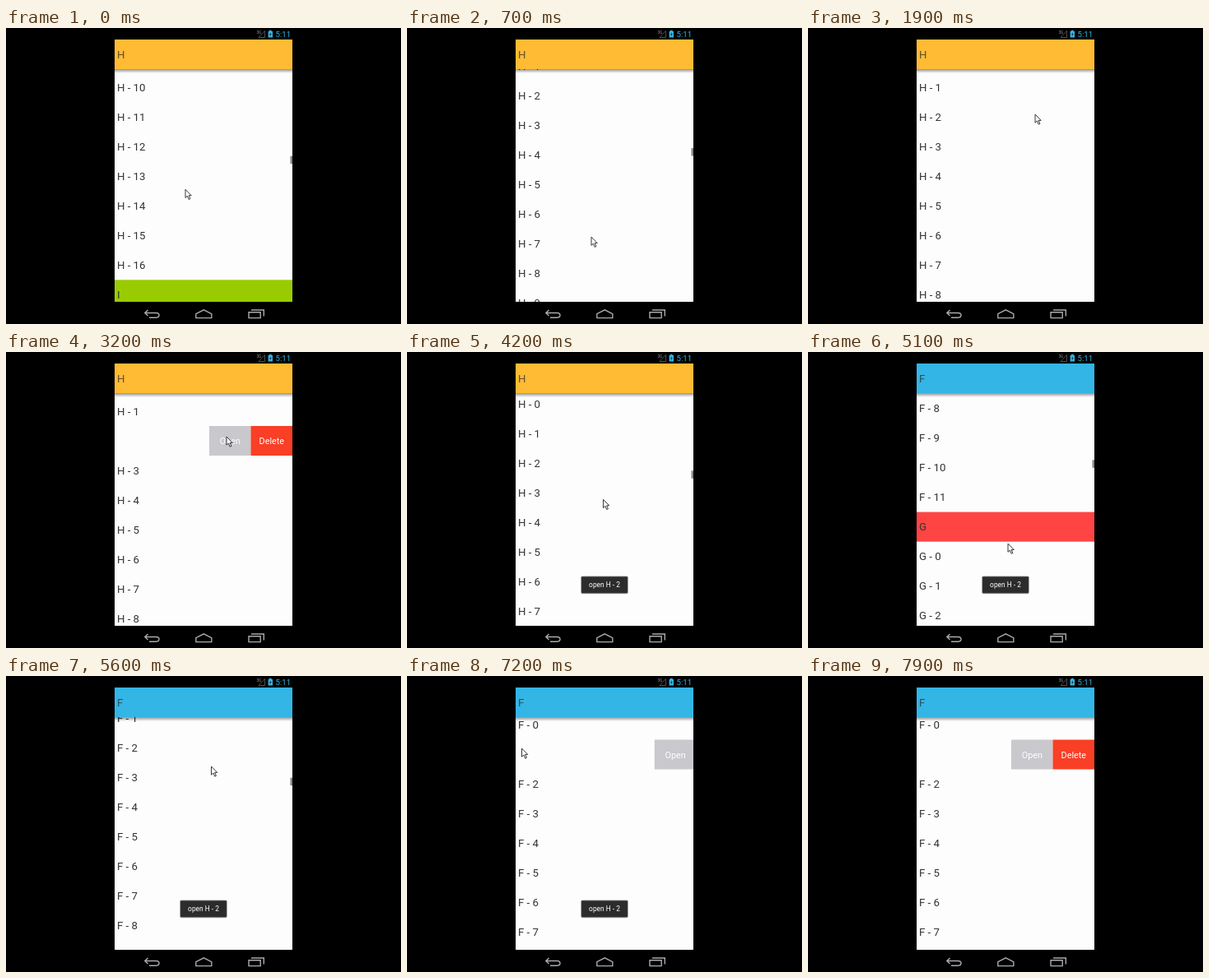
Write an HTML page that moves like this. It is 480 by 360 pixels and loops after 8000 ms.

```html
<!DOCTYPE html>
<html lang="en">
<head>
<meta charset="utf-8">
<title>Pinned section list</title>
<style>
  html, body { margin: 0; width: 100%; height: 100%; overflow: hidden; background: #000; }
  svg { display: block; width: 480px; height: 360px; }
  text { font-family: Roboto, "Noto Sans", sans-serif; white-space: pre; }
  .row { font-size: 13.2px; fill: #333; }
  .btn { font-size: 10.8px; fill: #fff; text-anchor: middle; }
</style>
</head>
<body>
<svg viewBox="0 0 480 360">
  <defs>
    <clipPath id="screen"><rect x="132" y="14" width="216" height="319"/></clipPath>
    <linearGradient id="shade" x1="0" y1="0" x2="0" y2="1">
      <stop offset="0" stop-color="#000" stop-opacity=".42"/>
      <stop offset="1" stop-color="#000" stop-opacity="0"/>
    </linearGradient>
  </defs>
  <rect width="480" height="360" fill="#000"/>

  <g id="status">
    <path d="M307 11.5H314.5V3.5Z" fill="none" stroke="#555" stroke-width=".9"/>
    <text x="304.5" y="6.8" font-size="4.6" fill="#999">3G</text>
    <path d="M320 2.8H322.6V4H324V11.4H318.6V4H320Z" fill="#33b5e5"/>
    <path d="M322 5.2L320 8.2H321.3L320.7 10.3L322.8 7.2H321.4Z" fill="#123"/>
    <text x="327.6" y="10.6" font-size="9.6" fill="#33b5e5">5:11</text>
  </g>

  <g clip-path="url(#screen)">
    <rect x="132" y="14" width="216" height="319" fill="#fdfdfd"/>
    <g id="rows"></g>
    <g id="menu">
      <rect width="50.5" height="36" fill="#c8c8cd"/>
      <rect x="50.5" width="50.5" height="36" fill="#f93f25"/>
      <text class="btn" x="25.3" y="22">Open</text>
      <text class="btn" x="75.8" y="22">Delete</text>
    </g>
    <rect id="shadow" x="132" width="216" fill="url(#shade)"/>
    <g id="pin">
      <rect x="132" width="216" height="36"/>
      <text class="row" x="135" y="22.8" opacity=".8"></text>
    </g>
    <rect id="thumb" x="345.5" width="2.5" height="9.5" fill="#888"/>
    <g id="toast">
      <rect x="211" y="272.5" width="58" height="22" rx="2" fill="#000" opacity=".16"/>
      <rect x="212" y="273.2" width="56" height="20" rx="1" fill="#2c2c2c" stroke="#444" stroke-width=".6"/>
      <text x="240" y="286.3" font-size="8.4" fill="#fff" text-anchor="middle">open H - 2</text>
    </g>
  </g>

  <g fill="none" stroke="#aaa" stroke-width="1.4">
    <path d="M172.5 343L168.8 346.5L172.5 350M169 346.5H182.5Q186 346.5 186 349.3T182.5 352.2H174"/>
    <path d="M230.8 352.6V347.6L240.3 342.8L249.8 347.6V352.6Z"/>
    <path d="M295 345.8H309.2V352.6H295ZM298 343H313.3V350.6"/>
  </g>
  <path id="cursor" d="M0 0V10.2L2.4 8L4.2 12.2L5.9 11.4L4.1 7.4H7.2Z" fill="#fff" stroke="#222" stroke-width=".9"/>
</svg>
<script>
const LOOP = 8000, ROW = 36, TOP = 14, VIEW = 319, MENU_RIGHT = 348;
const COLORS = ['#99cc00', '#33b5e5', '#ff4444', '#ffbb33'];
const SECTIONS = 15;
const $ = id => document.getElementById(id);

// Build the sectioned list
const items = [], heads = [];
for (let s = 0; s < SECTIONS; s++) {
  const letter = String.fromCharCode(65 + s);
  const count = Math.floor(Math.abs(Math.cos(2 * Math.PI / 3 * SECTIONS / (s + 1))) * 25 + 1e-6);
  const head = { label: letter, color: COLORS[s % 4], pos: items.length * ROW };
  heads.push(head);
  items.push(head);
  for (let n = 0; n < count; n++) items.push({ label: letter + ' - ' + n });
}

// Smooth, non-overshooting curve through [time, value] points
function track(pts) {
  const slope = i => (pts[i + 1][1] - pts[i][1]) / (pts[i + 1][0] - pts[i][0]);
  const tan = pts.map((p, i) => {
    if (!i || i === pts.length - 1) return 0;
    const a = slope(i - 1), b = slope(i);
    return a * b > 0 ? 2 * a * b / (a + b) : 0;
  });
  return t => {
    if (t <= pts[0][0]) return pts[0][1];
    for (let i = 0; i < pts.length - 1; i++) {
      const [t0, v0] = pts[i], [t1, v1] = pts[i + 1];
      if (t > t1) continue;
      const h = t1 - t0, u = (t - t0) / h, w = 1 - u;
      return v0 * (1 + 2 * u) * w * w + tan[i] * h * u * w * w
        + v1 * u * u * (3 - 2 * u) - tan[i + 1] * h * u * u * w;
    }
    return pts[pts.length - 1][1];
  };
}

const scroll = track([[-100, 4382], [0, 4352], [250, 4252], [500, 4110], [900, 4028],
  [4120, 4028], [4200, 4001], [4400, 3910], [4700, 3791], [4850, 3765],
  [5100, 3600], [5350, 3455], [5600, 3365], [6000, 3320.5]]);
const barAlpha = track([[0, 1], [1200, 1], [1450, 0], [4100, 0], [4130, 1], [6300, 1], [6550, 0]]);
const toastAlpha = track([[3700, 0], [3850, 1], [7300, 1], [7500, 0]]);
const swipes = [
  { label: 'H - 2', open: track([[1950, 0], [2170, 47], [2420, 101], [3300, 101], [3600, 0]]) },
  { label: 'F - 1', open: track([[6980, 0], [7200, 47], [7450, 101]]) }
];
const cursorX = track([[0, 218], [300, 222], [1500, 228], [1900, 276], [1960, 276], [2200, 145],
  [2350, 145], [2800, 268], [3400, 268], [4050, 239], [4400, 238], [4700, 236],
  [5100, 243], [5600, 249.5], [6200, 262], [6800, 296], [6980, 290], [7200, 139.5], [7350, 141], [7800, 216]]);
const cursorY = track([[-100, 166], [0, 196], [250, 290], [450, 292], [1000, 200], [1500, 190], [1900, 105],
  [2200, 104], [2800, 103], [3400, 103], [4120, 152], [4200, 179], [4400, 265],
  [4700, 65], [4850, 68], [5100, 233], [5200, 238], [5600, 110], [6300, 96], [6800, 90],
  [7200, 88], [7350, 89], [7800, 193]]);

// Pool of visible rows
const NS = 'http://www.w3.org/2000/svg';
function make(tag, parent, attrs) {
  const el = document.createElementNS(NS, tag);
  set(el, attrs);
  return parent.appendChild(el);
}
function set(el, attrs) {
  for (const k in attrs) el.setAttribute(k, attrs[k]);
}
const pool = Array.from({ length: 10 }, () => {
  const g = make('g', $('rows'), {});
  return {
    g,
    bg: make('rect', g, { x: 132, width: 216, height: ROW }),
    text: make('text', g, { class: 'row', y: 22.8 })
  };
});
const [pinBg, pinText] = $('pin').children;

function draw(t) {
  const pos = scroll(t), first = Math.floor(pos / ROW);
  const swipe = swipes[t < 5000 ? 0 : 1], open = swipe.open(t);
  $('menu').setAttribute('visibility', 'hidden');

  pool.forEach((row, i) => {
    const item = items[first + i], y = TOP + (first + i) * ROW - pos;
    const moved = item.label === swipe.label && open > 0;
    set(row.g, { transform: `translate(0 ${y})` });
    set(row.bg, { fill: item.color || 'none' });
    set(row.text, { x: 135 - (moved ? open : 0) });
    row.text.textContent = item.label;
    if (moved) set($('menu'), { visibility: 'visible', transform: `translate(${MENU_RIGHT - open} ${y})` });
  });

  // Pinned header, pushed up by the next one
  const k = heads.findLastIndex(h => h.pos <= pos);
  const gap = heads[k + 1].pos - pos;
  set($('pin'), { transform: `translate(0 ${TOP + Math.min(0, gap - ROW)})` });
  set(pinBg, { fill: heads[k].color });
  pinText.textContent = heads[k].label;
  set($('shadow'), { y: TOP + ROW, height: Math.max(0, Math.min(5, gap - ROW)) });

  set($('thumb'), { y: TOP + pos * VIEW / (items.length * ROW) + 0.5, opacity: barAlpha(t) });
  set($('toast'), { opacity: toastAlpha(t) });
  set($('cursor'), {
    transform: `translate(${cursorX(t)} ${cursorY(t)})`,
    visibility: t < 7900 ? 'visible' : 'hidden'
  });
}

const start = performance.now();
function tick(now) {
  draw(Math.max(0, now - start) % LOOP);
  requestAnimationFrame(tick);
}
draw(0);
requestAnimationFrame(tick);
</script>
</body>
</html>
```
